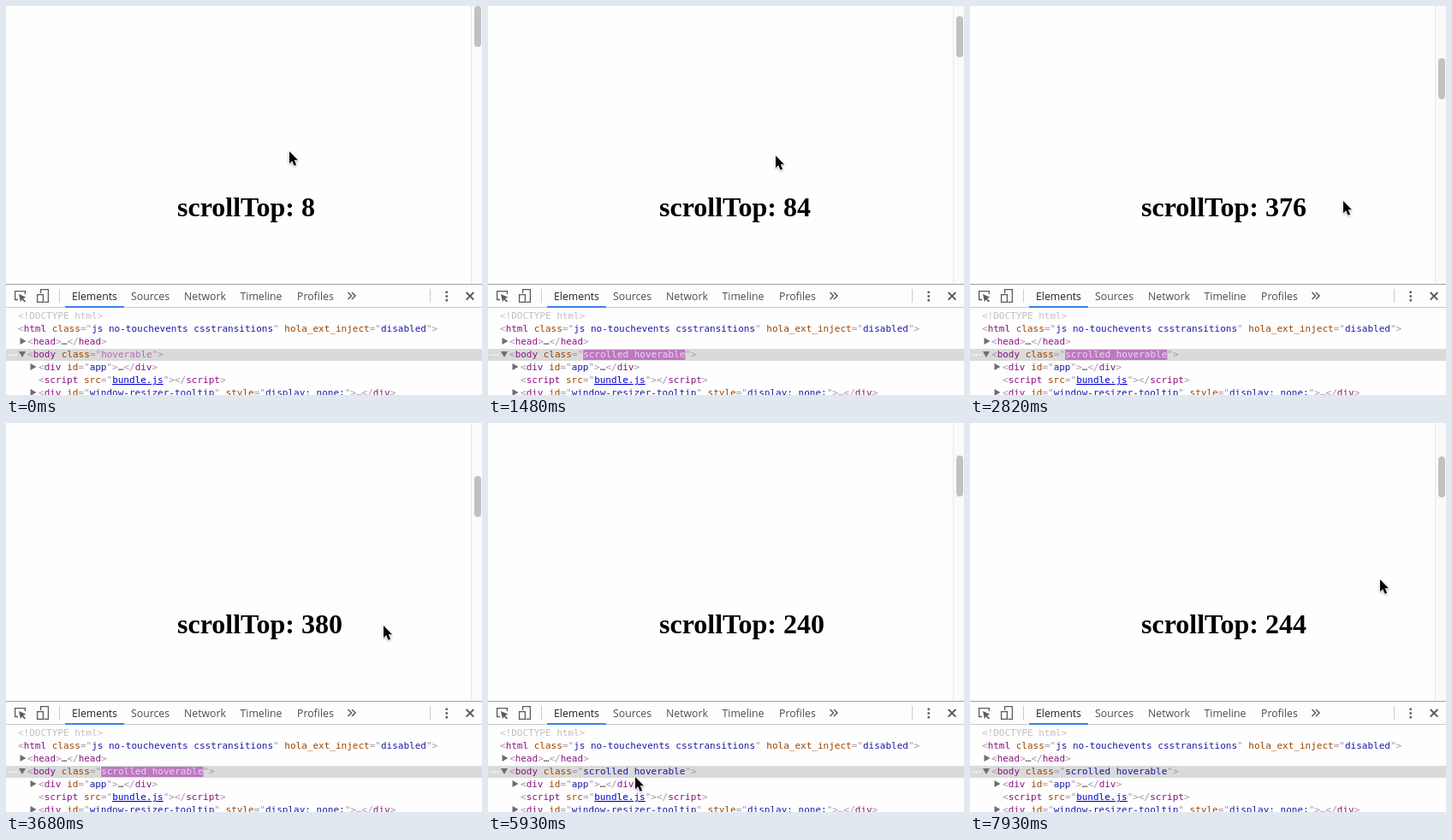
Write an HTML page that moves like this. It is 556x455 px and loops after 7990 ms.

```html
<!DOCTYPE html>
<html lang="en">
<head>
<meta charset="utf-8">
<title>scrollTop</title>
<style>
  html, body { margin: 0; width: 100%; height: 100%; overflow: hidden; background: #fefefe; }
  svg { display: block; width: 100vw; height: 100vh; }
  text { white-space: pre; }
  .title { font: bold 32px "Liberation Serif", serif; }
  .tabs { font: 12.3px "Open Sans", sans-serif; fill: #4c4c4c; }
  .code { font: 11px "DejaVu Sans Mono", monospace; fill: #a894a6; }
  .t { fill: #881280; }
  .a { fill: #994500; }
  .v { fill: #1a1aa6; }
  .l { fill: #0000d8; text-decoration: underline; }
  .d { fill: #444; }
  .icon { fill: none; stroke: #5a5a5a; stroke-width: 1.3; }
  .solid { fill: #5a5a5a; stroke: none; }
  #cursor { stroke: #fff; stroke-width: 1.4; stroke-linejoin: round; paint-order: stroke;
    filter: drop-shadow(0 1px 1px rgba(0, 0, 0, .3)); }
</style>
</head>
<body>
<svg viewBox="0 0 556 455" preserveAspectRatio="none">
  <rect width="556" height="455" fill="#fefefe"/>
  <rect x="543" width="13" height="325" fill="#fafafa"/>
  <rect x="543" width="1" height="325" fill="#e7e7e7"/>
  <rect id="thumb" x="547" width="8" height="48" rx="4" fill="#c1c1c1"/>
  <text id="title" class="title" x="200" y="246"></text>

  <rect y="325" width="556" height="28" fill="#fdfdfd"/>
  <rect y="325" width="556" height="1" fill="#a3a3a3"/>
  <rect y="352" width="556" height="1" fill="#ccc"/>
  <rect x="69" y="351" width="69" height="2" fill="#3b82f0"/>
  <path d="M62.5 331V347M495.5 331V347" stroke="#ccc"/>
  <g class="icon">
    <path d="M14 343.5H10.6V333.6H22.4V337"/>
    <path class="solid" d="M15 337L23.5 340.8L20 342.1L23 345.3L21.8 346.5L18.7 343.3L17 346.2Z"/>
    <path d="M40.6 336V331.6H49.4V346.4H44.5"/>
    <rect x="36.6" y="337.6" width="6.8" height="8.8"/>
    <path d="M399.5 335l4 4l-4 4m4.5 -8l4 4l-4 4" stroke-width="1.5"/>
    <path d="M514.7 333.5v12" stroke-width="2.4" stroke-dasharray="2.4"/>
    <path d="M537.7 335l8.6 8.6m0 -8.6l-8.6 8.6" stroke-width="2"/>
  </g>
  <g id="tabs" class="tabs"></g>

  <rect y="401" width="556" height="14" fill="#dadada"/>
  <rect id="flash" x="111.2" y="402" height="12"/>
  <path d="M2.5 408.3h10" stroke="#fff" stroke-width="1.6" stroke-dasharray="2"/>
  <g id="arrows" fill="#6e6e6e"></g>
  <g id="code" class="code"></g>

  <path id="cursor" d="M0 0V14.2L3.2 11.2L5.6 16.8L8.1 15.7L5.7 10.3H10Z"/>
</svg>
<script>
const LOOP = 7990;
const CHAR = 6.622;
const $ = id => document.getElementById(id);

// Markup helpers for the element tree
const span = (cls, s) => `<tspan class="${cls}">${s}</tspan>`;
const attr = (name, value, cls = 'v') => ` ${span('a', name)}="${span(cls, value)}"`;
const open = (tag, attrs = '') => `&lt;${span('t', tag)}${attrs}&gt;`;
const close = tag => `&lt;/${span('t', tag)}&gt;`;
const folded = (tag, attrs) => open(tag, attrs) + span('d', '…') + close(tag);

const rows = [
  [14, '<tspan fill="#c0c0c0">&lt;!DOCTYPE html&gt;</tspan>'],
  [14, open('html', attr('class', 'js no-touchevents csstransitions') + attr('hola_ext_inject', 'disabled'))],
  [25, folded('head')],
  [25, open('body', ` ${span('a', 'class')}="<tspan id="bodyClass"></tspan>"`)],
  [38, folded('div', attr('id', 'app'))],
  [38, open('script', attr('src', 'bundle.js', 'l')) + close('script')],
  [38, folded('div', attr('id', 'window-resizer-tooltip') + attr('style', 'display: none;'))]
];
$('code').innerHTML = rows.map(([x, s], i) => `<text x="${x}" y="${366 + 15 * i}">${s}</text>`).join('');

const closedArrow = (x, y) => `<path d="M${x} ${y - 4}l7 4l-7 4Z"/>`;
$('arrows').innerHTML = closedArrow(16.5, 392) + closedArrow(28.5, 422) +
  closedArrow(28.5, 452) + '<path d="M15 404h8l-4 7Z"/>';

const tab = (name, x, fill = '') => `<text x="${x}" y="344" fill="${fill}">${name}</text>`;
$('tabs').innerHTML = tab('Elements', 77, '#222') + tab('Sources', 146) +
  tab('Network', 208) + tab('Timeline', 273.5) + tab('Profiles', 340);

// Motion helpers: ramp runs from 0 to 1 between two times
const linear = p => p;
const smooth = p => p * p * (3 - 2 * p);
const slowStart = p => p ** 3.3;
const slowEnd = p => 1 - (1 - p) ** 2;
const ramp = (t, from, to, ease = linear) => ease(Math.min(1, Math.max(0, (t - from) / (to - from))));

function scrollAt(t) {
  return 8 + 76 * ramp(t, 170, 1480) + 292 * ramp(t, 1480, 2600, smooth) +
    4 * ramp(t, 2820, 3680) - 140 * ramp(t, 3680, 4140, smooth) + 4 * ramp(t, 7850, 7930);
}

function cursorAt(t) {
  const nudge = ramp(t, 170, 1480);
  const drift = ramp(t, 1480, 2820, smooth);
  const settle = ramp(t, 2820, 3680);
  const dive = ramp(t, 3680, 4440, slowStart);
  const sway = ramp(t, 4620, 6990);
  const leave = ramp(t, 6990, 7930, smooth);
  return [
    331 + 5 * nudge + 100 * drift + 5 * settle - 277 * dive +
      8 * sway + 44 * Math.sin(sway * 2.69 * 2 * Math.PI) + 348 * leave,
    170 + 5 * nudge + 53 * drift + 9 * settle + 186 * dive - 35 * sway ** 2.3 - 205 * leave
  ];
}

// Three-stop colour blend
const flashFill = [[190, 120, 192], [227, 193, 228], [218, 218, 218]];
const flashText = [[238, 212, 241], [190, 134, 198], [26, 26, 166]];
function blend(stops, p) {
  const i = p < 0.5 ? 0 : 1;
  const k = p * 2 - i;
  return `rgb(${stops[i].map((v, c) => Math.round(v + (stops[i + 1][c] - v) * k))})`;
}

function draw(t) {
  const [x, y] = cursorAt(t).map(Math.round);
  $('cursor').setAttribute('transform', `translate(${x} ${y})`);

  const top = Math.round(scrollAt(t));
  $('title').textContent = `scrollTop: ${top}`;
  $('thumb').setAttribute('y', Math.max(0, Math.round(top * 0.168 - 2)));

  const scrolled = t >= 230;
  const name = scrolled ? 'scrolled hoverable' : 'hoverable';
  const fade = ramp(t, 4060, 5400, slowEnd);
  $('bodyClass').textContent = name;
  $('bodyClass').setAttribute('fill', scrolled ? blend(flashText, fade) : '#b66cba');
  $('flash').setAttribute('width', scrolled ? name.length * CHAR : 0);
  $('flash').setAttribute('fill', blend(flashFill, fade));
}

const start = performance.now();
function tick() {
  draw((performance.now() - start) % LOOP);
  requestAnimationFrame(tick);
}
tick();
</script>
</body>
</html>
```
